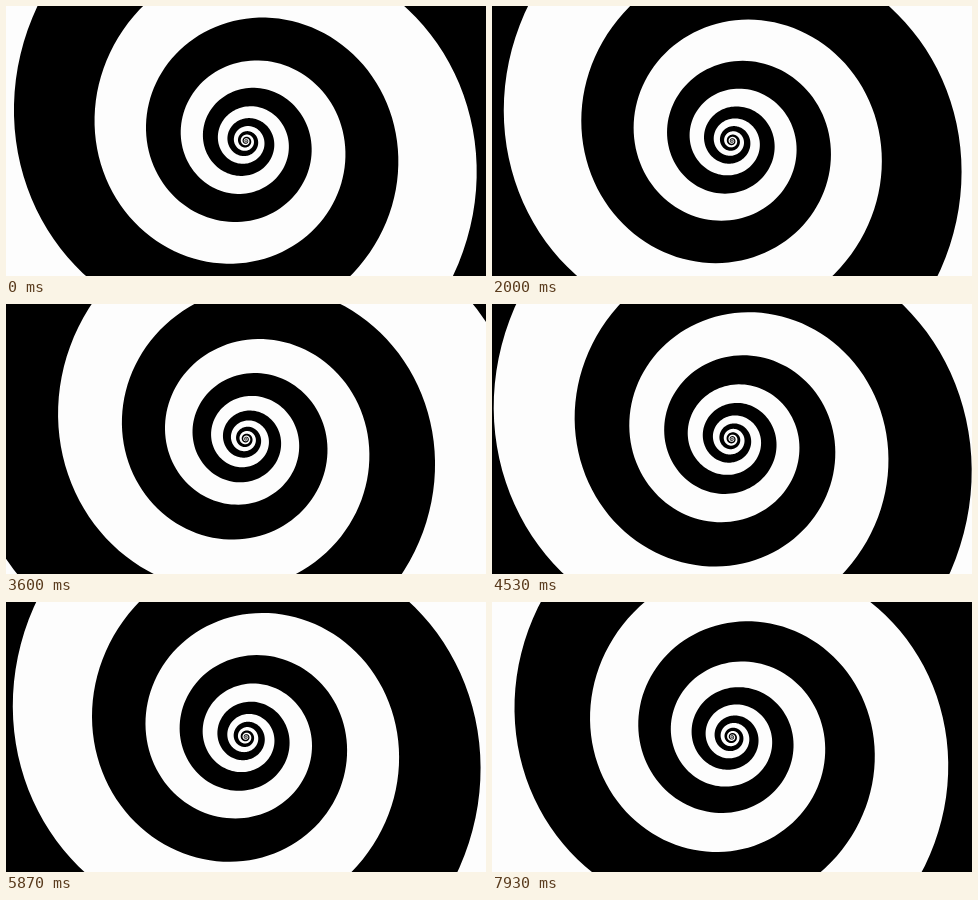
Animation, 480 px wide and 270 px high, one loop 8 s. Source, as an HTML page:

```html
<!DOCTYPE html>
<html lang="en">
<head>
<meta charset="utf-8">
<title>Spiral</title>
<style>
  html, body { margin: 0; width: 100%; height: 100%; overflow: hidden; background: #fdfdfd; }
  svg { display: block; width: 100%; height: 100%; }
</style>
</head>
<body>
<svg viewBox="-240 -135 480 270"><path id="arm"/></svg>
<script>
const LOOP_MS = 8000;
const GROWTH = 2.32;         // radius factor per turn
const RADIUS = 230;          // outer edge on the left axis
const ARM_WIDTH = 0.507;     // share of a turn covered by the black arm
const FIRST_TURN = -8, LAST_TURN = 2, STEPS_PER_TURN = 120;
const STEPS_PER_REVOLUTION = 39;

const arm = document.getElementById('arm');

// Logarithmic spiral, growing clockwise from the left axis.
function edge(offset) {
  const points = [];
  for (let i = FIRST_TURN * STEPS_PER_TURN; i <= LAST_TURN * STEPS_PER_TURN; i++) {
    const turn = i / STEPS_PER_TURN;
    const r = RADIUS * GROWTH ** (turn - offset);
    const angle = Math.PI * (1 + 2 * turn);
    points.push(`${(r * Math.cos(angle)).toFixed(3)},${(r * Math.sin(angle)).toFixed(3)}`);
  }
  return points;
}

arm.setAttribute('d', `M${[...edge(0), ...edge(ARM_WIDTH).reverse()].join('L')}Z`);

function draw(now) {
  // 15 pictures per second, with start times rounded to 10 ms.
  const ticks = Math.floor((now % LOOP_MS) / 10);
  const picture = Math.floor((ticks * 3 + 1) / 20);
  // Each picture advances two steps; only the first one advances a single step.
  const step = Math.max(0, 2 * picture - 1);
  arm.setAttribute('transform', `rotate(${360 * step / STEPS_PER_REVOLUTION})`);
}

const start = performance.now();
function tick() {
  draw(performance.now() - start);
  requestAnimationFrame(tick);
}
tick();
</script>
</body>
</html>
```
